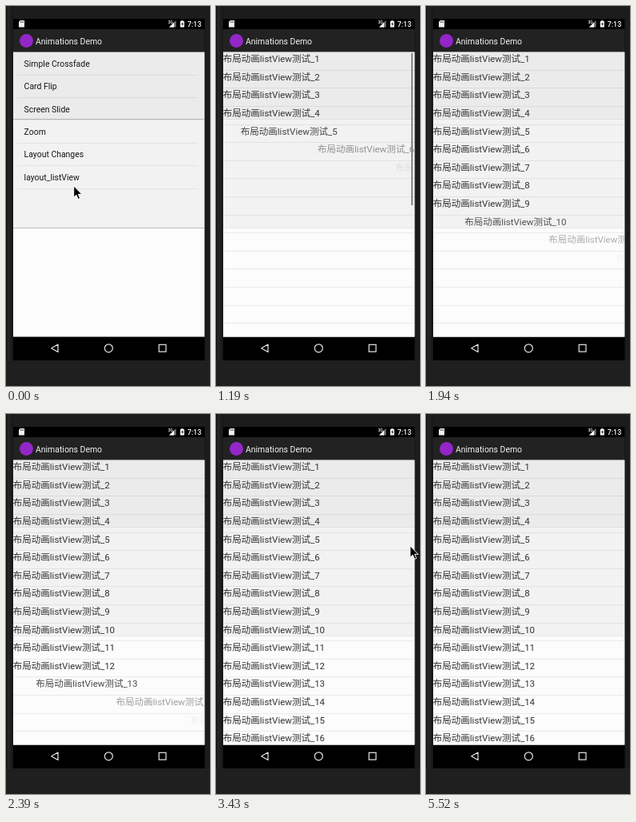
Recreate the animation shown at these times as an HTML page. Size 255 px wide and 475 px high, loop 5.96 s.

```html
<!DOCTYPE html>
<html lang="zh-CN">
<head>
<meta charset="utf-8">
<title>Animations Demo</title>
<style>
html, body { margin: 0; width: 100%; height: 100%; overflow: hidden; background: #1c1c1c; }
svg { display: block; width: 255px; height: 475px; }
text { font-family: Roboto, "Noto Sans CJK SC", "Noto Sans CJK", sans-serif; white-space: pre; }
.menu { font-size: 10.45px; fill: #161616; }
.bar { font-size: 10.45px; fill: #f4f4f4; }
.item { font-size: 11.5px; fill: #333; }
.clock { font-size: 8.9px; font-weight: 500; fill: #fff; }
.nav { fill: none; stroke: #e6e6e6; stroke-width: 1.2; }
</style>
</head>
<body>
<svg viewBox="0 0 255 475">
  <defs>
    <clipPath id="screen"><rect x="9" y="29" width="239.5" height="384.5"/></clipPath>
    <linearGradient id="edge">
      <stop offset="0" stop-color="#2c2c2c"/>
      <stop offset="1" stop-color="#171717"/>
    </linearGradient>
    <g id="window">
      <rect x="9" y="29" width="239.5" height="28.5" fill="#222"/>
      <rect x="9" y="57.5" width="239.5" height="84" fill="#ebebeb"/>
      <rect x="9" y="141.5" width="239.5" height="136" fill="#f2f2f2"/>
      <rect x="9" y="277.5" width="239.5" height="140" fill="#fcfcfc"/>
      <circle cx="25.5" cy="43.5" r="8.5" fill="#9326c6"/>
      <text class="bar" x="37" y="47.8">Animations Demo</text>
    </g>
  </defs>

  <rect width="255" height="475" fill="#1c1c1c"/>
  <rect width="9" height="475" fill="url(#edge)"/>
  <rect width="1.5" height="475" fill="#111"/>
  <rect y="443" width="255" height="32" fill="#1f1f1f"/>
  <rect x="9" y="16" width="239.5" height="427" fill="#000"/>

  <g clip-path="url(#screen)">
    <g id="menu"><use href="#window"/></g>
    <g id="list">
      <use href="#window"/>
      <g id="rows"></g>
      <rect id="thumb" x="244" y="59" width="2" height="190" fill="#858585"/>
    </g>
  </g>

  <path d="M17.8 18H23v8.5h-7v-6.6z" fill="#f2f2f2"/>
  <path d="M18.5 19v2M20 19v2M21.5 19v2" stroke="#333" stroke-width=".7"/>
  <text x="202.5" y="22" font-size="5" font-weight="500" fill="#fff">3G</text>
  <path d="M212.5 18v8.5H204z" fill="#777"/>
  <path d="M210 20.5v6h-6z" fill="#fff"/>
  <path d="M219.3 18h2v1h1.5v7.5h-5V19h1.5z" fill="#fff"/>
  <path d="M220.8 20l-1.8 3h1.2v2l1.8-3h-1.2z" fill="#222"/>
  <text class="clock" x="226.7" y="26">7:13</text>

  <g class="nav">
    <path d="M65 423v9.6l-8.3-4.8z" stroke-linejoin="round"/>
    <circle cx="128.3" cy="427.8" r="5"/>
    <rect x="191.2" y="423.3" width="8.8" height="8.8"/>
  </g>

  <path id="cursor" d="M.7.9v14.3l3.2-3 2.3 5.2 2.4-1-2.3-5.1h4.5z"
        fill="#000" stroke="#fff" stroke-width="1"/>
</svg>
<script>
const LOOP = 5960, TICK = 149;
const ROW = 22.6, WIDTH = 239.5, SLIDE = 500, STAGGER = 150, COUNT = 16;

// tick, ms since the list began to lay out its rows
const CLOCK = [[2, 40], [3, 200], [8, 1002], [13, 1717], [18, 2502], [21, 2973]];

// first tick, x, y (no position: hidden)
const CURSOR = [
  [0, 84, 224], [2, 85, 231], [3, 85.5, 241], [4, 110, 271], [5, 170, 271], [6, 240, 271], [7],
  [23, 242, 164], [24, 232, 100], [25, 225, 50.5], [27],
  [34, 204, 394.5], [35, 212, 424], [36, 221, 455], [37]
];

const $ = id => document.getElementById(id);

function add(parent, tag, attrs, text = '') {
  const el = document.createElementNS('http://www.w3.org/2000/svg', tag);
  for (const key in attrs) el.setAttribute(key, attrs[key]);
  el.textContent = text;
  return parent.appendChild(el);
}

function divider(parent, x, y, width) {
  add(parent, 'rect', { x, y: Math.round(y), width, height: 1, fill: '#000', opacity: .065 });
}

['Simple Crossfade', 'Card Flip', 'Screen Slide', 'Zoom', 'Layout Changes', 'layout_listView']
  .forEach((label, i) => {
    add($('menu'), 'text', { class: 'menu', x: 22.6, y: 75.8 + i * 28.4 }, label);
    divider($('menu'), 14, 85.6 + i * 28.4, 226);
  });

const items = Array.from({ length: COUNT }, (_, i) => {
  divider($('rows'), 9, 57.2 + (i + 1) * ROW, WIDTH);
  return add($('rows'), 'text', { class: 'item', x: 8.8, y: 70.2 + i * ROW }, '布局动画listView测试_' + (i + 1));
});

const clamp = v => Math.max(0, Math.min(1, v));
const easeInOut = p => (1 - Math.cos(Math.PI * p)) / 2;

function listTime(tick) {
  if (tick < CLOCK[0][0]) return 0;
  const next = CLOCK.findIndex(c => c[0] > tick);
  if (next < 0) return CLOCK[CLOCK.length - 1][1];
  const [t0, v0] = CLOCK[next - 1], [t1, v1] = CLOCK[next];
  return v0 + (v1 - v0) * (tick - t0) / (t1 - t0);
}

function draw(tick) {
  const time = listTime(tick);

  // the new window rises and fades in over the menu
  const opened = time - 86;
  const rise = 32 * (1 - clamp(opened / 350)) ** 5;
  $('list').setAttribute('transform', `translate(0 ${rise})`);
  $('list').setAttribute('opacity', 1 - (1 - clamp(opened / 200)) ** 3);
  $('thumb').setAttribute('opacity', clamp((10 - tick) / 2));

  items.forEach((item, i) => {
    const shown = easeInOut(clamp((time - i * STAGGER) / SLIDE));
    item.setAttribute('transform', `translate(${(1 - shown) * WIDTH} 0)`);
    item.setAttribute('opacity', shown);
  });

  const [, x, y] = CURSOR.filter(c => c[0] <= tick).pop();
  $('cursor').setAttribute('visibility', x === undefined ? 'hidden' : 'visible');
  if (x !== undefined) $('cursor').setAttribute('transform', `translate(${x} ${y})`);
}

const start = performance.now();
let last = -1;
function loop() {
  const t = (performance.now() - start) % LOOP;
  const tick = Math.min(39, Math.floor((t + 6) / TICK));
  if (tick !== last) draw(last = tick);
  requestAnimationFrame(loop);
}
loop();
</script>
</body>
</html>
```
